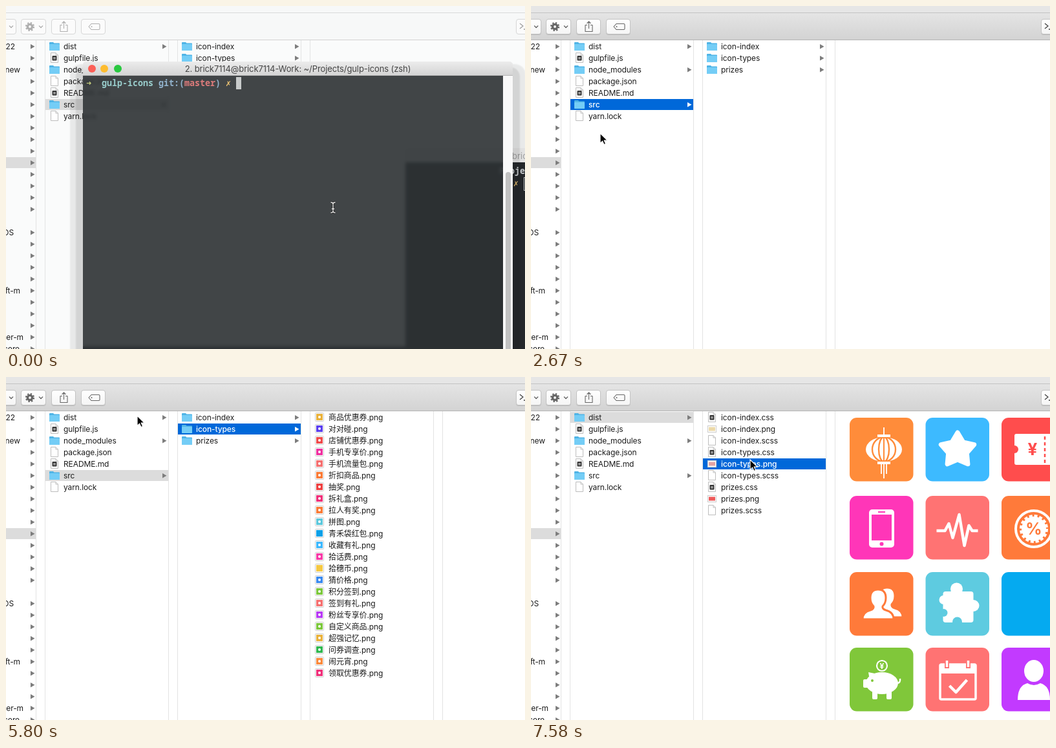
An HTML page for the animation above (8 s loop, 803x531 px).

```html
<!DOCTYPE html>
<html lang="zh-CN">
<head>
<meta charset="utf-8">
<title>gulp-icons</title>
<style>
html, body { margin: 0; width: 100%; height: 100%; overflow: hidden; background: #fff; }
[hidden] { display: none !important; }
#stage, #stage div, #stage svg { position: absolute; }
#stage { left: 0; top: 0; width: 803px; height: 531px; overflow: hidden; cursor: default;
  font: 12px/17px Inter, "Noto Sans CJK SC", "Noto Sans CJK", sans-serif; color: #1c1c1c; white-space: pre; }
#finder, #desk { inset: 0; }
#finder { background: #fafbfb; }
#finder.active { background: #fff; }
#bar { left: 0; top: 0; width: 803px; height: 52px; background: #f7f8f8; border-bottom: 1px solid #d2d2d2; }
.active #bar { background: linear-gradient(#e6e6e6 10px, #e4e4e4 12px, #d3d3d3 52px); border-color: #b4b4b4; }
#bar::after { content: ""; position: absolute; left: 0; top: 10px; width: 803px; height: 1px; background: #d9d9d9; }
.active #bar::after { background: #c2c2c2; }
.btn { top: 20px; height: 22px; border: 1px solid #d6d6d6; border-radius: 4px; background: #fbfbfb; }
.active .btn { border-color: #c3c3c3; background: linear-gradient(#fff, #f5f5f5); box-shadow: 0 1px #bbb; }
.btn svg { inset: 0; opacity: .5; }
.active .btn svg { opacity: 1; }
.line { top: 53px; width: 1px; height: 478px; background: #e3e3e3; }
.list { top: 54px; width: 190px; }
.row { left: 0; width: 190px; height: 17px; letter-spacing: -.1px; }
.row span { position: absolute; left: 28px; }
.row svg { left: 6px; top: 0; }
.row .tri { left: 181px; top: 5px; fill: #7d7d7d; }
.row.dim { background: #dcdcdc; }
.row.on { background: #0068d9; color: #fff; font-weight: 500; }
.row.on .tri { fill: #fff; }
#left .row { width: 46px; }
#left span { left: auto; right: calc(46px - var(--end)); }
#left .tri { left: 38px; }
#preview { left: 471px; top: 53px; width: 332px; height: 478px; background: #fff; }
#back { left: 618px; top: 220px; width: 300px; height: 330px; background: #282c2f; }
#back .cap { left: 0; top: 0; width: 300px; height: 22px; background: #f3f3f3; }
.mono { font: 600 13.333px/19px "Noto Sans Mono", "DejaVu Sans Mono", monospace; color: #d6dadd; }
.mono i { font: bold 13.333px/19px "DejaVu Sans Mono", monospace; display: inline-block; width: 8px; height: 19px; vertical-align: top; }
#term { left: 119px; top: 86px; width: 665px; height: 470px; border-radius: 5px 5px 0 0;
  box-shadow: 0 20px 2px 11px rgba(0,0,0,.09), 0 24px 2px 20px rgba(0,0,0,.07); }
#title { left: 0; top: 0; width: 665px; height: 22px; border-radius: 5px 5px 0 0; text-align: center;
  font-size: 13px; line-height: 23px; letter-spacing: -.1px; color: #444;
  background: linear-gradient(#ececec, #d3d3d3); box-shadow: inset 0 -1px #b5b5b5; }
.dot { top: 5px; width: 12px; height: 12px; border-radius: 50%; }
#body { left: 0; top: 22px; width: 650px; height: 448px; background: rgba(45,49,52,.9); backdrop-filter: blur(2.5px); }
#text { left: 5px; top: 24px; }
#scroll { left: 650px; top: 22px; width: 15px; height: 448px; background: #f9f9f9; }
#thumb { left: 4px; top: 149px; width: 8px; height: 320px; border-radius: 4px; background: #c1c1c1; }
.g { color: #c5ce7e } .c { color: #98cccb } .b { color: #92b3cd } .r { color: #dd7b7b }
.y { color: #f0c674 } .m { color: #c0a4ca } .k { color: #0c0d0e }
.mono .cur { background: #c8cbcb; }
#ptr, #beam { left: 0; top: 0; overflow: visible; }
</style>
</head>
<body>
<div id="stage">
  <div id="finder"><div id="bar"></div></div>
  <div id="desk">
    <div style="left:119px;top:527px;width:500px;height:9px;background:#282c2f"></div>
    <div id="back">
      <div class="cap"></div>
      <div style="left:165px;top:4px;font-size:13px;color:#a9a9a9">brick7114</div>
      <div class="mono" style="left:145px;top:26px">Projects</div>
      <div class="mono" style="left:167px;top:45px"><i class="y">✗</i></div>
      <div style="left:183px;top:45px;width:8px;height:19px;border:1px solid #c8cbcb"></div>
    </div>
    <div id="term">
      <div id="body"></div>
      <div id="title"></div>
      <div id="scroll"><div id="thumb"></div></div>
      <div id="text" class="mono"></div>
    </div>
  </div>
  <svg id="beam" width="1" height="1"><path d="M-3.5-8q3 0 3.5 2q.5-2 3.5-2M0-6V6M-3.5 8q3 0 3.5-2q.5 2 3.5 2M-2 2h4"
    fill="none" stroke="#222" stroke-width="3"/><path d="M-3.5-8q3 0 3.5 2q.5-2 3.5-2M0-6V6M-3.5 8q3 0 3.5-2q.5 2 3.5 2M-2 2h4"
    fill="none" stroke="#eee" stroke-width="1.3"/></svg>
  <svg id="ptr" width="1" height="1"><path d="M0 0V15.5L3.6 12.2L6 17.6L8.6 16.5L6.3 11.2H11.2Z"
    fill="#000" stroke="#fff" stroke-width="1.2"/></svg>
</div>
<script>
const $ = id => document.getElementById(id);
const finder = $('finder'), bar = $('bar');

function add(parent, cls, css, html = '') {
  const el = document.createElement('div');
  el.className = cls;
  el.style.cssText = css;
  el.innerHTML = html;
  parent.append(el);
  return el;
}
const svg = (w, h, inner, cls = '') => `<svg class="${cls}" width="${w}" height="${h}">${inner}</svg>`;
const rect = (x, y, w, h, fill, more = '') =>
  `<rect x="${x}" y="${y}" width="${w}" height="${h}" fill="${fill}" ${more}/>`;
const circle = (x, y, r, fill = '#fff', more = '') =>
  `<circle cx="${x}" cy="${y}" r="${r}" fill="${fill}" ${more}/>`;
const stroke = (d, color, w, more = '') =>
  `<path d="${d}" fill="none" stroke="${color}" stroke-width="${w}" stroke-linejoin="round" ${more}/>`;
const shape = (d, fill = '#fff', more = '') => `<path d="${d}" fill="${fill}" ${more}/>`;

// Toolbar
const chevron = x => stroke(`M${x} 9.5l3 3l3-3`, '#666', 1.3);
[
  [-24, 39, chevron(28)],
  [23, 38, circle(13, 11, 3.6, 'none', 'stroke="#666" stroke-width="3.4"') +
    circle(13, 11, 6, 'none', 'stroke="#666" stroke-width="2.2" stroke-dasharray="2.36 2.36"') + chevron(27)],
  [70, 37, stroke('M16 8.5h-3v10h11v-10h-3M18.5 14V3.5M15.5 6l3-3l3 3', '#666', 1.1)],
  [116, 37, stroke('M11 11l4-4.5h11.5q1.5 0 1.5 1.5v6q0 1.5-1.5 1.5H15z', '#666', 1.1) + circle(15.5, 11, 1, '#666')],
  [789, 38, stroke('M5 6l5 4l-5 4M11 15h7', '#444', 1.3)]
].forEach(([x, w, art]) => add(bar, 'btn', `left:${x}px;width:${w - 1}px`, svg(w, 22, art)));

// Columns
const tri = svg(7, 8, '<path d="M0 0L6.5 3.7L0 7.4Z"/>', 'tri');
const page = shape('M2.5.5h7.5l3.5 3.5v11.5h-11z', '#fff', 'stroke="#bdbdbd"') + stroke('M10 .5v3.5h3.5', '#bdbdbd', 1);
const icons = {
  dir: () => shape('M0 3q0-1 1-1h5l1.5 1.5h7.5q1 0 1 1v9.5q0 1-1 1h-14q-1 0-1-1z', '#4fb4e6') +
    rect(0, 5, 16, 10, '#74cdf6', 'rx="1"'),
  doc: () => page,
  code: () => page + rect(4.5, 5, 7, 7.5, '#333', 'rx="1"') + rect(6.2, 7, 3.6, 3.6, '#999'),
  wide: c => rect(1.5, 3.5, 13, 10, '#fff', 'stroke="#ccc"') + rect(3, 5.5, 10, 6, c),
  tile: c => rect(1.5, 1.5, 13, 13, '#fff', 'stroke="#ccc" rx="1"') + rect(3, 3, 10, 10, c) + circle(8, 8, 2),
  plain: c => rect(1.5, 1.5, 13, 13, '#fff', 'stroke="#ccc" rx="1"') + rect(3, 3, 10, 10, c),
  coin: c => rect(1.5, 1.5, 13, 13, '#fff', 'stroke="#ccc" rx="1"') + circle(8, 8, 4.8, c)
};

// Each item is "name kind colour"
function list(x, items) {
  const el = add(finder, 'list', `left:${x}px`);
  items.forEach((item, i) => {
    const [name, kind, color] = item.split(' ');
    add(el, 'row', `top:${18 * i}px`,
      svg(16, 17, icons[kind](color)) + `<span>${name}</span>` + (kind == 'dir' ? tri : ''));
  });
  return el;
}
function select(el, index, active) {
  [...el.children].forEach((row, i) =>
    row.className = 'row' + (i == index ? active ? ' on' : ' dim' : ''));
}

const lines = [46, 60, 251, 265, 456, 470, 661, 675].map(x => add(finder, 'line', `left:${x}px`));

const left = add(finder, 'list', 'left:0');
left.id = 'left';
const ends = { 0: ['22', 14], 2: ['new', 22], 16: ['OS', 12], 21: ['soft-m', 22], 25: ['er-m', 27], 26: ['core', 21] };
for (let i = 0; i < 27; i++) if (i != 15) {
  const [name, end] = ends[i] || ['', 0];
  add(left, i == 10 ? 'row dim' : 'row', `top:${18 * i}px;--end:${end}px`, `<span>${name}</span>${tri}`);
}

const root = list(61, ['dist dir', 'gulpfile.js code', 'node_modules dir', 'package.json doc',
  'README.md code', 'src dir', 'yarn.lock doc']);
const src = list(266, ['icon-index dir', 'icon-types dir', 'prizes dir']);
const thumbs = { 'icon-index': '#ecd9a8', 'icon-types': '#e2a3a3', prizes: '#ee5a5a' };
const dist = list(266, Object.keys(thumbs).flatMap(k => [k + '.css code', `${k}.png wide ${thumbs[k]}`, k + '.scss doc']));

const pngs = text => list(471, text.trim().split(/\s*,\s*/).map(s => s.replace(' ', '.png ')));
const prizes = pngs(`兑换券 wide #e4957f, 实物 tile #f07a35, 手机优惠券 wide #f0305a, 手机流量卷 wide #f59040,
  手机话费 wide #9380d6, 青禾袋红包 wide #e81c34, 拾穗币 coin #f5c518, 积分 coin #f7b733, 谢谢参与 wide #c9c4c4`);
const types = pngs(`商品优惠券 tile #e9b13a, 对对碰 tile #5a3ff0, 店铺优惠券 tile #f04a4a, 手机专享价 tile #f030a0,
  手机流量包 tile #f57070, 折扣商品 tile #fa7a35, 抽奖 tile #ee4040, 拆礼盒 tile #f0307a, 拉人有奖 tile #fa7a35,
  拼图 tile #5cc8dc, 青禾袋红包 plain #0aa0e8, 收藏有礼 tile #3db8ff, 拾话费 tile #f83aa8, 拾穗币 plain #f5c842,
  猜价格 tile #3a8af0, 积分签到 tile #7cc83c, 签到有礼 tile #f57070, 粉丝专享价 tile #b83af5, 自定义商品 tile #7cc83c,
  超强记忆 tile #e9b13a, 问券调查 tile #30b850, 闹元宵 tile #fb8a3c, 领取优惠券 tile #f0307a`);

// Sprite preview: a colour and a white glyph per tile
const label = (s, x, y, size, c) =>
  `<text x="${x}" y="${y}" font-size="${size}" font-weight="700" fill="${c}" text-anchor="middle">${s}</text>`;
const ring = (rx, c) => `<ellipse cx="53" cy="49" rx="${rx}" ry="19" fill="none" stroke="${c}" stroke-width="2.4"/>`;
const star = Array.from({ length: 10 }, (_, i) => {
  const a = i * Math.PI / 5, r = i % 2 ? 15 : 27;
  return [49.5 + r * Math.sin(a), 50 - r * Math.cos(a)].map(v => v.toFixed(1));
}).join(' ');
const person = (x, y, c) => shape(`M${x - 24} ${y + 40}q0-11 12-14q6-2 5-6q-5-5-5-13q0-13 12-13t12 13q0 8-5 13q-1 4 5 6q12 3 12 14z`, '#fff', `stroke="${c}" stroke-width="3"`);
const tiles = [
  ['#ff8c3a', c => '<ellipse cx="53" cy="49" rx="28" ry="19" fill="#fff"/>' + ring(18, c) + ring(8, c) +
    stroke('M53 29v40', c, 2) + rect(43, 26, 20, 4, '#fff') + rect(43, 68, 20, 4, '#fff') +
    stroke('M53 15v12M49 71v16M53 71v23M57 71v16', '#fff', 1.8)],
  ['#3dbaff', () => `<polygon points="${star}" fill="#fff" stroke="#fff" stroke-width="7" stroke-linejoin="round"/>`],
  ['#ff4d4d', c => rect(20, 25, 70, 48, '#fff', 'rx="3"') + circle(20, 49, 6, c) +
    stroke('M67 29v42', c, 2.5, 'stroke-dasharray="5 4"') + label('¥', 48, 58, 26, c)],
  ['#ff36b8', c => rect(30, 21, 39, 59, '#fff', 'rx="5"') + rect(34, 29, 31, 40, c) +
    circle(49.5, 74.5, 3, c) + rect(44, 24, 11, 2, c)],
  ['#ff7373', () => stroke('M17 54H30L36 43L42 65L52 29L60 77L67 46L72 54H81', '#fff', 4.5)],
  ['#ff7a3a', c => circle(50, 51, 28, 'none', 'stroke="#fff" stroke-width="4"') + circle(50, 51, 19) +
    circle(50, 51, 20, 'none', 'stroke="#fff" stroke-width="4" stroke-dasharray="5 2.85"') + label('%', 50, 60, 25, c)],
  ['#ff7a3a', c => person(58, 30, c) + person(44, 33, c)],
  ['#5ecbe0', c => rect(27, 30, 47, 48, '#fff', 'rx="4"') + circle(48, 26, 9.5) + circle(74, 52, 9) + circle(28, 43, 7) +
    circle(49, 77, 7.5, c) + circle(28, 63, 6, c)],
  ['#05aaf0', () => ''],
  ['#80c73a', () => '<ellipse cx="50" cy="55" rx="25" ry="17" fill="#fff"/>' + circle(50, 28, 8, 'none', 'stroke="#fff" stroke-width="2.2"') +
    label('¥', 50, 32.5, 12, '#fff') + rect(21, 49, 10, 13, '#fff', 'rx="2"') + shape('M29 38l10 2v8l-8 2z') +
    rect(35, 66, 8, 14, '#fff', 'rx="2"') + rect(57, 66, 8, 14, '#fff', 'rx="2"') + stroke('M73 55q6 0 5-7', '#fff', 2.5) +
    circle(35, 51, 2, '#80c73a')],
  ['#ff7373', c => rect(22.5, 26, 55, 54, 'none', 'rx="2" stroke="#fff" stroke-width="3.5"') + rect(22, 26, 56, 14, '#fff') +
    stroke('M33 19v13M66 19v13', c, 7) + stroke('M33 20v10M66 20v10', '#fff', 3.5) + stroke('M37 59l10 10l17-19', '#fff', 4.5)],
  ['#c23aff', () => '<ellipse cx="50" cy="36" rx="15" ry="17" fill="#fff"/>' + shape('M25 81q0-22 15-26q10 6 20 0q15 4 15 26z')]
];
const preview = add(finder, '', '', svg(332, 478, tiles.map(([c, art], i) => {
  const x = 22 + i % 3 * 117.5, y = [10, 131, 249, 366][i / 3 | 0];
  return `<g transform="translate(${x} ${y})">${rect(0, 0, 98.5, 98.5, c, 'rx="11"')}${art(c)}</g>`;
}).join('')));
preview.id = 'preview';

// Terminal
const span = (cls, s) => `<span class="${cls}">${s}</span>`;
const prompt = `<i class="g">➜</i>  ${span('c', 'gulp-icons')} ${span('b', 'git:(')}${span('r', 'master')}${span('b', ')')} <i class="y">✗</i> `;
const log = (sec, s) => `[${span('k', '14:10:0' + sec)}] ${s}`;
const start = (sec, name) => log(sec, `Starting '${span('c', name)}'...`);
const done = (sec, name, ms) => log(sec, `Finished '${span('c', name)}' after ${span('m', ms + ' ms')}`);
const output = [
  [3, log(4, `Using gulpfile ${span('m', '~/Projects/gulp-icons/gulpfile.js')}`)],
  [3, start(4, 'default')],
  [3, start(4, 'icons:sprite')],
  [5, done(4, 'default', '1.74')],
  [7, done(5, 'icons:sprite', 749)],
  [7, start(5, 'icons:css')],
  [8, done(5, 'icons:css', 46)],
  [8, prompt]
];
[[8, '#fc5f57'], [27, '#fdbc2f'], [48, '#29c840']].forEach(([x, c]) => add($('term'), 'dot', `left:${x}px;background:${c}`));

function terminal(n) {
  const rows = [prompt + 'gulp'.slice(0, [0, 2, 4][n] ?? 4)];
  output.forEach(([at, s]) => n >= at && rows.push(s));
  if (n >= 3 && n < 8) rows.push('');
  $('text').innerHTML = rows.join('\n') + '<i class="cur"></i>';
  $('title').textContent = `2. brick7114@brick7114-Work: ~/Projects/gulp-icons (${n < 3 ? 'zsh' : 'node'})`;
}

// Pointer path: tick, x, y
const path = [
  [0, 506, 312], [5, 506, 312], [8, 304, 296], [9, 304, 296], [10, 295, 288], [11, 295, 288], [15, 130, 272],
  [17, 87, 263], [18, 107, 197], [19, 125, 184], [23, 320, 96], [24, 332, 96], [27, 502, 100], [31, 380, 78],
  [34, 413, 60], [35, 413, 60], [40, 150, 60], [41, 158, 60], [43, 275, 66], [48, 328, 128], [51, 339, 128], [60, 339, 128]
];
function pointer(n) {
  const i = path.findIndex(p => p[0] > n), [a, x, y] = path[i - 1], [b, u, v] = path[i];
  const k = (n - a) / (b - a);
  return [x + (u - x) * k, y + (v - y) * k].map(Math.round);
}

const SELECT = [23, 31, 40, 48], FRONT = 18, LOOP = 8000, TICK = 148.75;

function show(n) {
  const front = n >= FRONT, view = SELECT.filter(s => n >= s).length;
  finder.classList.toggle('active', front);
  $('desk').hidden = front;
  if (!front) terminal(n);
  src.hidden = view > 2;
  dist.hidden = view < 3;
  prizes.hidden = view != 1;
  types.hidden = view != 2;
  preview.hidden = view != 4;
  lines[6].hidden = lines[7].hidden = view < 1 || view > 3;
  select(root, view < 3 ? 5 : 0, front && view % 3 == 0);
  select(src, [-1, 2, 1][view], true);
  select(dist, view == 4 ? 4 : -1, true);

  const [x, y] = pointer(n), typing = !front && x > 119 && y > 108;
  $('ptr').style.display = typing ? 'none' : '';
  $('beam').style.display = typing ? '' : 'none';
  $(typing ? 'beam' : 'ptr').style.transform = `translate(${x}px, ${y}px)`;
}

let last = -1;
const t0 = performance.now();
function frame() {
  const t = (performance.now() - t0) % LOOP;
  const n = Math.floor((t + 12) / TICK);
  if (n != last) show(last = n);
  requestAnimationFrame(frame);
}
frame();
</script>
</body>
</html>
```
